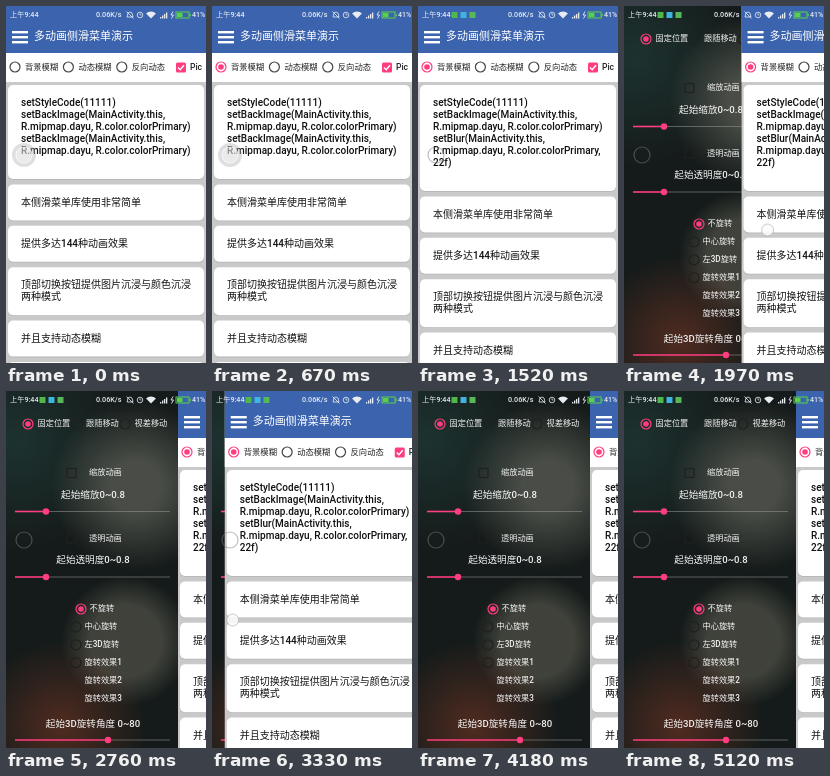
These frames come from a looping animation (200 px wide and 357 px high, 5.53 s). An HTML page with a canvas:

```html
<!DOCTYPE html>
<html lang="zh-CN">
<head>
<meta charset="utf-8">
<title>侧滑菜单演示</title>
<style>
html, body { margin: 0; width: 100%; height: 100%; overflow: hidden; background: #222; }
canvas { display: block; width: 100vw; height: 100vh; }
</style>
</head>
<body>
<canvas></canvas>
<script>
const W = 200, H = 357, LOOP = 5530, TICK = 138.5, OPEN = 172, TAU = Math.PI * 2;
const BLUE = '#3c64ae', PINK = '#ff3d7f';
const FONT = "Roboto, 'Noto Sans CJK SC', 'Noto Sans CJK', sans-serif";
const canvas = document.querySelector('canvas');
const c = canvas.getContext('2d');

const SET_IMAGE = ['setBackImage(MainActivity.this,', 'R.mipmap.dayu, R.color.colorPrimary)'];
const CODE_PLAIN = ['setStyleCode(11111)', ...SET_IMAGE, ...SET_IMAGE];
const CODE_BLUR = ['setStyleCode(11111)', ...SET_IMAGE, 'setBlur(MainActivity.this,',
  'R.mipmap.dayu, R.color.colorPrimary,', '22f)'];
const NOTES = [['本侧滑菜单库使用非常简单'], ['提供多达144种动画效果'],
  ['顶部切换按钮提供图片沉浸与颜色沉浸', '两种模式'], ['并且支持动态模糊'], ['']];

function smooth(k, from, to) {
  const u = Math.min(1, Math.max(0, (k - from) / (to - from)));
  return u * u * (3 - 2 * u);
}
// Positions over time, counted in ticks: open, close, open again.
const closing = k => smooth(k, 20, 24.8);
const drawerX = k => OPEN * (smooth(k, 12, 15.2) - closing(k) + smooth(k, 25.5, 29.7));
const enterX = k => W * (1 - smooth(k, 6.85, 10));

function rect(x, y, w, h, color) {
  c.fillStyle = color;
  c.fillRect(x, y, w, h);
}
function round(x, y, w, h, r, color) {
  c.beginPath();
  c.roundRect(x, y, w, h, r);
  c.fillStyle = color;
  c.fill();
}
function disc(x, y, r, color) {
  c.beginPath();
  c.arc(x, y, r, 0, TAU);
  c.fillStyle = color;
  c.fill();
}
function ring(x, y, r, color, width = 1) {
  c.beginPath();
  c.arc(x, y, r, 0, TAU);
  c.strokeStyle = color;
  c.lineWidth = width;
  c.stroke();
}
function line(color, width, ...points) {
  c.beginPath();
  points.forEach(p => c.lineTo(...p));
  c.strokeStyle = color;
  c.lineWidth = width;
  c.stroke();
}
function text(s, x, y, size, color, align = 'left') {
  c.font = `500 ${size}px ${FONT}`;
  c.textAlign = align;
  c.textBaseline = 'middle';
  c.fillStyle = color;
  c.fillText(s, x, y);
}
function radio(x, y, on, idle) {
  ring(x, y, 5, on ? PINK : idle, 1.2);
  if (on) disc(x, y, 2.8, PINK);
}
// Soft spot: even up to the given core, then fading out.
function glow(x, y, r, rgb, alpha, core = 0) {
  const g = c.createRadialGradient(x, y, r * core, x, y, r);
  g.addColorStop(0, `rgba(${rgb},${alpha})`);
  g.addColorStop(1, `rgba(${rgb},0)`);
  rect(0, 0, W, H, g);
}

function page(x, blurOn, code) {
  c.save();
  c.translate(x, 0);
  rect(0, 0, W, H, '#c9c9c9');
  rect(0, 0, W, 47, BLUE);
  for (let i = 0; i < 3; i++) rect(6, 25 + i * 5, 16, 2.4, '#fff');
  text('多动画侧滑菜单演示', 28, 31, 11, '#fff');

  rect(0, 47, W, 29, '#fff');
  ['背景模糊', '动态模糊', '反向动态'].forEach((label, i) => {
    const cx = 9 + i * 53.4;
    radio(cx, 61, i === 0 && blurOn, '#444');
    text(label, cx + 10, 61.5, 8.3, '#222');
  });
  round(170, 56.5, 10, 10, 1.5, PINK);
  line('#fff', 1.4, [172, 61.5], [174.2, 63.8], [178, 59.2]);
  text('Pic', 184, 61.5, 8.5, '#222');

  let top = 79;
  for (const lines of [code, ...NOTES]) {
    const height = 24 + lines.length * 12 + (lines === code ? 10 : 0);
    round(2, top + 0.8, 196, height, 5, '#b4b4b4');
    round(2, top, 196, height, 5, '#fff');
    lines.forEach((s, i) => text(s, 15, top + 18.3 + i * 12, 10, '#111'));
    top += height + 5.4;
  }
  c.restore();
}

function slider(y, value) {
  line('rgba(150,150,150,.55)', 1, [value, y], [164, y]);
  line(PINK, 1.6, [9, y], [value, y]);
  disc(value, y, 3.2, PINK);
}

function menu() {
  rect(0, 0, W, H, '#151b1a');
  glow(10, 50, 110, '34,66,62', 0.6);
  glow(130, 95, 85, '108,110,100', 0.6, 0.3);
  glow(120, 250, 65, '92,92,80', 0.6, 0.55);
  glow(55, 335, 85, '120,54,36', 0.6);

  const white = '#f2f2f2', idle = '#20211f';
  ['固定位置', '跟随移动', '视差移动'].forEach((s, i) => {
    const cx = 22 + i * 48.5;
    radio(cx, 33, i === 0, idle);
    text(s, cx + 9.5, 33, 8.2, white);
  });
  [['缩放动画', '起始缩放0~0.8'], ['透明动画', '起始透明度0~0.8']].forEach(([label, title], i) => {
    const y = 82 + i * 65.5;
    c.strokeStyle = idle;
    c.lineWidth = 1.2;
    c.strokeRect(61, y - 4.5, 9, 9);
    text(label, 83, y, 8.2, white);
    text(title, 87, y + 22, 9.6, white, 'center');
    slider(y + 38.5, 40);
  });
  ['不旋转', '中心旋转', '左3D旋转', '旋转效果1', '旋转效果2', '旋转效果3'].forEach((s, i) => {
    const y = 218 + i * 17.9, x = i ? 70 : 75;
    if (i < 4) radio(x, y, i === 0, idle);
    text(s, x + 8.5, y, 8.2, white);
  });
  text('起始3D旋转角度 0~80', 87, 333.5, 9.6, white, 'center');
  slider(349, 102);
}

function statusBar(k) {
  const white = '#e8ecf2';
  text('上午9:44', 4, 9, 7.2, white);
  if (k >= 11) ['#4fb848', '#3fb4dc', '#58b858'].forEach((color, i) => rect(33.5 + i * 9, 6, 6, 6, color));
  text('0.06K/s', 90, 9, 7.2, white);
  // Muted bell and alarm clock
  line(white, 0.8, [121, 11], [122, 7], [124, 6], [126, 7], [127, 11], [121, 11]);
  line(white, 0.8, [120.5, 5.5], [127.5, 12.5]);
  ring(134, 9, 2.8, white, 0.8);
  line(white, 0.7, [134, 7.3], [134, 9], [135.4, 9]);
  // Wi-Fi fan, signal bars, charging battery
  c.beginPath();
  c.moveTo(145, 12.5);
  c.arc(145, 12.5, 7, -Math.PI * 0.75, -Math.PI * 0.25);
  c.fillStyle = white;
  c.fill();
  for (let i = 0; i < 4; i++) rect(154 + i * 2, 11 - i * 1.5, 1.3, 1.5 + i * 1.5, white);
  line(white, 0.9, [167, 5.5], [165, 9], [167.5, 9], [165.5, 12.5]);
  c.strokeStyle = '#58d04c';
  c.lineWidth = 1;
  c.strokeRect(170, 6, 13, 6);
  rect(171, 7, 5.5, 4, '#58d04c');
  rect(183.5, 7.7, 1.2, 2.6, '#58d04c');
  text('41%', 186, 9, 7, white);
}

function assistButton(k) {
  if (k < 11) {
    disc(18, 149, 12, 'rgba(175,175,175,.4)');
    disc(18, 149, 8, 'rgba(255,255,255,.35)');
    ring(18, 149, 8, 'rgba(255,255,255,.7)');
  } else {
    ring(18, 149, 8, 'rgba(125,125,125,.5)', 1.2);
  }
}

function finger(x, y) {
  disc(x, y, 6, 'rgba(250,250,250,.88)');
  ring(x, y, 6, 'rgba(150,150,150,.6)', 0.8);
}

function draw(k) {
  const x = drawerX(k);
  if (k < 7) {
    page(0, k >= 5, CODE_PLAIN);
  } else if (k < 10) {
    const edge = enterX(k);
    page((edge - W) / 4, true, CODE_PLAIN);
    rect(0, 0, edge, H, `rgba(0,0,0,${0.35 - 0.27 * edge / W})`);
    page(edge, true, CODE_BLUR);
  } else {
    menu();
    page(x, true, CODE_BLUR);
  }
  statusBar(k);
  assistButton(k);

  if (k === 4) finger(25, 61);
  const dragBack = closing(k) > 0 && closing(k) < 1;
  if (x > 0 && x < OPEN) finger(x + (dragBack ? 8 : 26), k < 20 ? 224 : 229);
}

const start = performance.now();
function frame() {
  const w = Math.round(innerWidth * devicePixelRatio), h = Math.round(innerHeight * devicePixelRatio);
  if (canvas.width !== w || canvas.height !== h) {
    canvas.width = w;
    canvas.height = h;
  }
  c.setTransform(w / W, 0, 0, h / H, 0, 0);
  draw(Math.floor(((performance.now() - start) % LOOP + 25) / TICK));
  requestAnimationFrame(frame);
}
frame();
</script>
</body>
</html>
```
